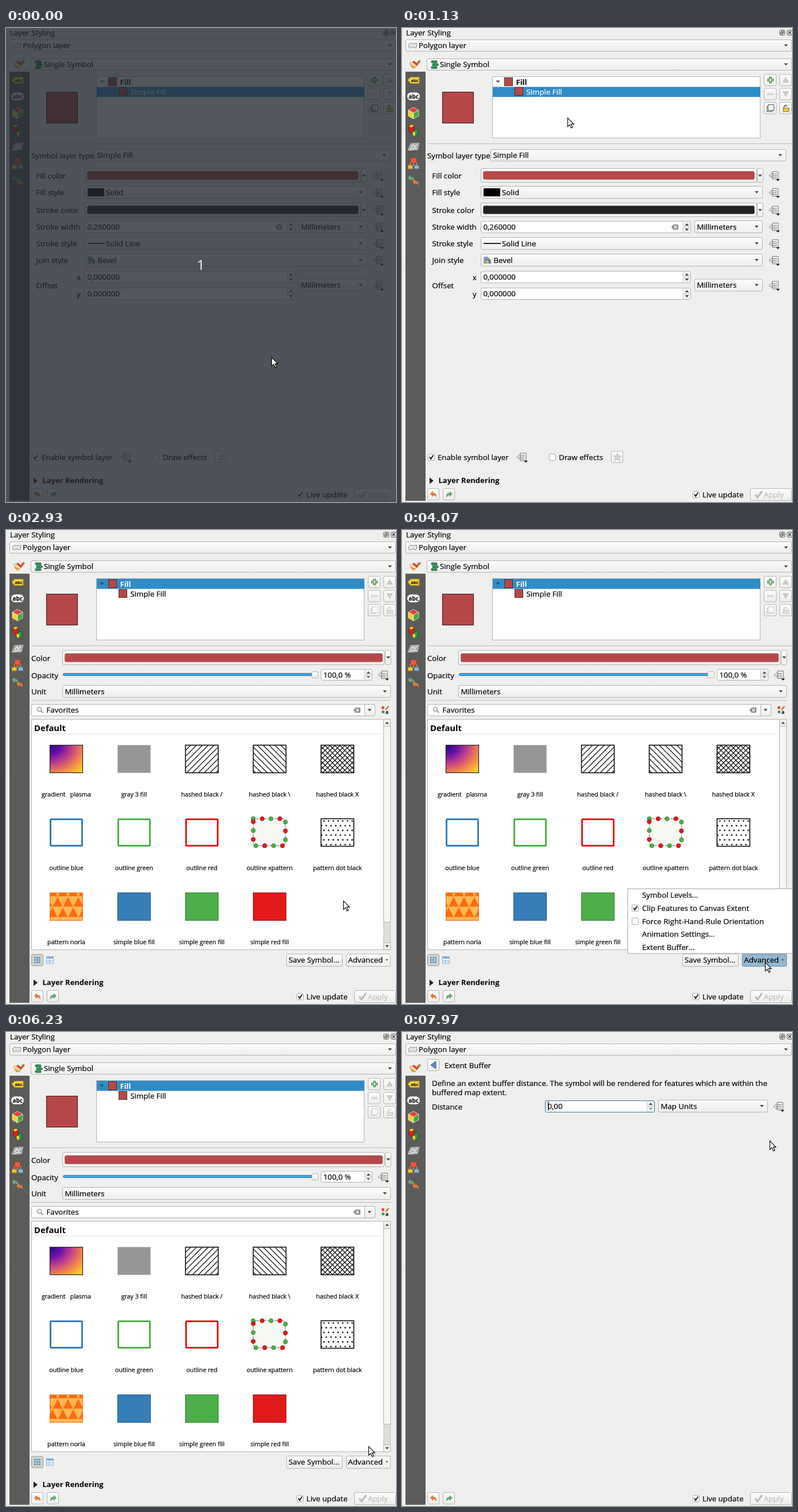
An HTML page that plays this animation: 679x825 px, repeating every 8 s.

```html
<!DOCTYPE html>
<html lang="en">
<head>
<meta charset="utf-8">
<title>Layer styling panel</title>
<style>
html, body { margin: 0; width: 100%; height: 100%; overflow: hidden; background: #efefee; }
svg { display: block; }
text { font: 13.25px "Open Sans", "Noto Sans", sans-serif; white-space: pre; stroke-width: .22; }
text.b { font-weight: 700; font-size: 13px; }
text.s { font-size: 10.7px; text-anchor: middle; }
</style>
</head>
<body>
<svg id="stage" width="679" height="825" viewBox="0 0 679 825" xmlns="http://www.w3.org/2000/svg"></svg>
<script>
const RED = '#b84848', BLUE = '#308cc6', EDGE = '#b3b3b1', BG = '#efefee';

// Drawing helpers, each returns SVG markup
const rect = (x, y, w, h, fill, stroke = 'none', rx = 0, more = '') =>
  `<rect x="${x}" y="${y}" width="${w}" height="${h}" fill="${fill}" stroke="${stroke}" rx="${rx}" ${more}/>`;
const path = (d, fill = 'none', stroke = 'none', sw = 1) =>
  `<path d="${d}" fill="${fill}" stroke="${stroke}" stroke-width="${sw}"/>`;
const text = (x, y, s, fill = '#000', cls = '') =>
  `<text x="${x}" y="${y}" fill="${fill}" stroke="${cls === 'b' ? 'none' : fill}" class="${cls}">${s}</text>`;
const dot = (x, y, r, fill, stroke = 'none') =>
  `<circle cx="${x}" cy="${y}" r="${r}" fill="${fill}" stroke="${stroke}"/>`;
const at = (x, y, body) => `<g transform="translate(${x} ${y})">${body}</g>`;
const group = (id, body) => `<g id="${id}">${body}</g>`;
const range = n => [...Array(n).keys()];

const down = (x, y, c = '#4c4c4c') => path(`M${x - 3.5} ${y - 2}h7l-3.5 4z`, c);
const up = (x, y, c = '#4c4c4c') => path(`M${x - 3.5} ${y + 2}h7l-3.5-4z`, c);
const button = (x, y, w, h, body = '') => rect(x, y, w, h, 'url(#face)', EDGE, 2.5) + body;
const combo = (x, y, w, h, label, lx = x + 4) =>
  button(x, y, w, h, text(lx, y + h / 2 + 4.7, label) + down(x + w - 10, y + h / 2));
const spin = (x, y, w, h, label, edge = EDGE, off = '#4c4c4c') =>
  rect(x, y, w, h, '#fff', edge, 2.5) +
  rect(x + w - 12.5, y + .5, 12, h - 1, '#f3f3f2', 'none', 2) +
  path(`M${x + w - 13} ${y}v${h}M${x + w - 13} ${y + h / 2}h13`, 'none', '#c8c8c6') +
  text(x + 4, y + h / 2 + 4.8, label) +
  up(x + w - 6.5, y + 5.5) + down(x + w - 6.5, y + h - 5.5, off);
const check = (x, y, on) => rect(x + .5, y + .5, 11, 11, '#fff', '#aaa', 1) +
  (on ? path(`M${x + 3} ${y + 5.5}l2.3 3.5 4.2-6.5`, 'none', '#111', 1.8) : '');
const override = (x, y) => at(x, y,
  path('M-9 0l6-5v-2h10v13h-10v-2zM-3-5v9M-3-3h8M-5 0h10M-3 3h8', '#f6f6f6', '#70706e') +
  path('M3 6h7l-3.5 3.5z', '#222'));
const clearMark = (x, y) => at(x, y,
  path('M-6 0l3.5-4.5H6v9H-2.5z', '#8b8b8b') + path('M-1.5-2.5l5 5m0-5l-5 5', 'none', '#fff', 1.2));
const swatch = (x, y) => rect(x + .5, y + .5, 14, 14, RED, '#4a2a2a');
const colorBar = (x, y, w, h, fill) => rect(x, y, w, h, fill, 'rgba(0,0,0,.25)', 2.5);
const triRight = (x, y) => path(`M${x} ${y - 5.5}v11l7-5.5z`, '#222');
const arrow = (x, y, c, flip = 1) => `<g transform="translate(${x} ${y}) scale(${flip} 1)">` +
  path('M-6-1.5l5-4.5v3c5 0 7 3 5.5 8.5-1-3-2.5-4-5.5-4v3z', c) + '</g>';

function sideIcons() {
  const brush = at(22, 63,
    path('M1 1l7-8 2.5 2-7 8z', '#c87a35', '#8f4f1c', .7) +
    path('M-9-3l5-1 8 6-2 3-5 2z', '#f0dfae', '#b59a58', .7) +
    path('M-4-4l3-2 7 6-2 3z', '#d9432f') +
    path('M-8-1q5 5 11 5l-4 3q-6 0-7-8z', '#ef9a3c'));
  const tag = path('M10 90.5l5-5h15v11H15z', '#f5cf3a', '#b8921c') +
    `<text x="15.5" y="93.5" style="font-size:7.5px;font-weight:700">abc</text>`;
  const mask = rect(9.5, 112.5, 21, 13, '#f5f5f5', '#e4e4e4', 6) +
    `<text x="11.5" y="122.5" style="font-size:10px;font-weight:700">abc</text>`;
  const cube = at(20, 148,
    path('M0-10l9 5-9 5-9-5z', '#e04038', '#fff', .7) + path('M-9-5l9 5v10l-9-5z', '#f2cf2c', '#fff', .7) +
    path('M9-5L0 0v10l9-5z', '#42a838', '#fff', .7));
  const bars = at(20, 178,
    path('M-8-7l5-3 4 2v10l-5 2-4-3z', '#d42222', '#6a1010', .7) + path('M-8-7l4 2 5-3-4-2z', '#f1d22f') +
    path('M1 0l3-2 4 2v8l-4 2-4-2z', '#2a9a3a', '#0c4c18', .7) + path('M-2 4l3-2 2 2v5l-3 1z', '#f1d22f'));
  const relief = at(20, 207,
    path('M-10 6l5-12 15-1-3 12z', '#a9a9a7', '#d0d0ce', .7) +
    path('M-5 2l4-6 3 4 4-5M-6 5l8-3 4 1', 'none', '#ececea', 1.4));
  const diagram = at(20, 236,
    path('M-5.5 3V-2H5.500V3M0-2v5', 'none', '#f0a060', 1.4) + rect(-5, -10, 10, 9, '#ee5a46', '#b43422') +
    rect(-9.5, 3, 8, 6, '#f1c13f', '#b88a1a') + rect(1.5, 3, 8, 6, '#8fb9dd', '#527ea5'));
  return brush + rect(6, 76, 35, 747, '#5b5b59') + tag + mask + cube + bars + relief + diagram +
    arrow(16, 262, '#6da879') + arrow(24, 269, '#e07b3c');
}

function frameParts() {
  const blob = path('M12 28q2-3 6-1 5 0 7-1 2 2 0 8-3 2-5-1-4 0-6 2-4-1-2-7z', '#e4e4e4', '#8a8a88');
  return rect(0, 0, 679, 825, BG) + text(7, 12.5, 'Layer Styling') +
    rect(657.5, 3.5, 9, 9, 'none', '#555', 2) + rect(661, 5.5, 3.5, 3.5, 'none', '#444') + rect(659.5, 7.5, 3, 3, BG, '#444') +
    rect(670.5, 3.5, 9, 9, 'none', '#555', 2) + path('M672.5 5.5l5 5m0-5l-5 5', 'none', '#333', 1.3) +
    combo(6.5, 20.5, 672, 20, 'Polygon layer', 29) + blob + sideIcons() +
    range(5).map(i => rect(1 + i % 2 * 2, 406 + i * 3, 1, 1, '#bbb')).join('') +
    button(44.5, 801.5, 20, 20, arrow(55, 812, '#e07b3c')) +
    button(71.5, 801.5, 20, 20, arrow(82, 812, '#6da879', -1)) +
    check(506, 806, true) + text(523, 816.7, 'Live update') +
    button(606.5, 801.5, 72, 21, path('M615 812l4 5 8-11', 'none', '#b9b9b7', 3)) + text(630, 816.7, 'Apply', '#bdbdbb');
}

function header() {
  const bars = [57, 62, 67].map((y, i) => rect(51 + (i === 1 ? 2 : 0), y, 10, 3.5, '#2e9c5c', '#17633a', 1)).join('');
  const plus = path('M641.5 85v11M636 90.5h11', 'none', '#2b7d36', 4.4) + path('M641.5 86v9M637 90.5h9', 'none', '#c4e8c1', 2);
  return combo(43.5, 53.5, 635, 20, 'Single Symbol', 66) + bars +
    rect(70.5, 111.5, 54, 54, RED, '#30181a') + rect(157.5, 84.5, 466, 107, '#fff', EDGE) +
    [80.5, 105, 129.5].map(y => button(630.5, y, 21, 20) + button(657.5, y, 21, 20)).join('') + plus +
    path('M668 85l6 10h-12z', '#c9c9c7') + path('M668 120l6-10h-12z', '#c9c9c7') +
    rect(636.5, 113.5, 10, 3, '#e2e2e0', '#cfcfcd') +
    path('M44 201.5H679', 'none', '#b9b9b7') +
    triRight(48, 788) + text(63.5, 792.3, 'Layer Rendering', '#000', 'b');
}

function tree(fillSelected) {
  const [a, b] = fillSelected ? ['#fff', '#000'] : ['#000', '#fff'];
  const ink = fillSelected ? '#c9c9c7' : '#555';
  return rect(158, fillSelected ? 85 : 102.5, 466, 17.5, BLUE) +
    path('M163.5 91.5h7l-3.5 4z', fillSelected ? '#1c4a68' : '#4c4c4c') +
    swatch(178, 86) + swatch(196, 103) +
    text(198.5, 98.5, 'Fill', a, 'b') + text(216.5, 116, 'Simple Fill', b) +
    rect(635.5, 136.5, 9, 9, '#eee', ink) + rect(637.5, 133.5, 10, 10, '#fafafa', ink) +
    path('M665 139v-2q3-5 5 0', 'none', ink, 1.6) +
    rect(663.5, 139.5, 10, 6, fillSelected ? '#dededc' : '#f0c443', fillSelected ? '#c9c9c7' : '#9a7a1c');
}

function simpleFill() {
  const rows = [['Fill color', 257], ['Fill style', 286.5], ['Stroke color', 317], ['Stroke width', 346.5],
    ['Stroke style', 375.5], ['Join style', 404.5], ['Offset', 448]];
  const colorButton = (y, fill) => button(137.5, y - 12.5, 480, 24) + colorBar(141.5, y - 7.5, 472, 14, fill) +
    button(618.5, y - 12.5, 10, 24, down(623.5, y));
  const bevel = at(142, 398, path('M1 12V1h6l5 5v6', '#a9c3dd', '#2d4f73') + path('M4 12V4h2l4 3v5', 'none', '#3d3d2d', 1.2) +
    path('M1 6l6 6M1 9l3 3', 'none', '#d9b52c', 1.2));
  return text(44, 226.7, 'Symbol layer type') + combo(154.5, 211.5, 514, 20, 'Simple Fill') +
    rows.map(([s, y]) => text(52.5, y + 4.8, s) + override(648, y)).join('') +
    colorButton(257, RED) + combo(137.5, 275.5, 490, 21, 'Solid', 174) + rect(142, 279, 29, 14, '#000') +
    colorButton(317, '#222221') +
    spin(137.5, 336.5, 365, 20, '0,260000') + clearMark(475, 346.5) +
    combo(509.5, 335.5, 118, 21, 'Millimeters') +
    combo(137.5, 364.5, 490, 21, 'Solid Line', 174) + path('M142 375h30', 'none', '#000', 1.7) +
    combo(137.5, 393.5, 490, 21, 'Bevel', 159.5) + bevel +
    text(123, 438.5, 'x') + text(123, 467.5, 'y') +
    spin(137.5, 423.5, 365, 20, '0,000000') + spin(137.5, 452.5, 365, 20, '0,000000') +
    combo(509.5, 437, 118, 21, 'Millimeters') +
    check(45, 741, true) + text(62, 751.7, 'Enable symbol layer') + override(209, 747) +
    check(256, 741, false) + text(273, 751.7, 'Draw effects') +
    button(364.5, 736.5, 20, 20, path('M375 740l2 4.5 5 .5-4 3 1.5 5-4.5-3-4.5 3 1.5-5-4-3 5-.5z', '#d4d4d2', '#bdbdbb'));
}

// Library symbols, drawn in a 57 x 48 box
const W = 57, H = 48;
const clipBox = body => `<svg width="${W}" height="${H}">${body}</svg>`;
const frame = (fill, stroke, sw = 1.2) => rect(0, 0, W, H, fill, stroke, 0, `stroke-width="${sw}"`);
const stripes = (slope, gap) => clipBox(path(range(14).map(i => slope > 0 ?
  `M${i * gap} -1l-60 60` : `M${W - i * gap} -1l60 60`).join(''), 'none', '#111', 1.3));
const hatched = body => frame('#fff', '#111') + body + frame('none', '#111', 1.5);
const outline = c => rect(1, 1, W - 2, H - 2, '#fff', c, 1, 'stroke-width="3"');

function beads() {
  const w = 56, h = 47;
  const point = s => s < w ? [s, 0] : s < w + h ? [w, s - w] : s < 2 * w + h ? [2 * w + h - s, h] : [0, 2 * (w + h) - s];
  return rect(0, 0, w, h, '#f5f8f3', '#777', 5, 'stroke-dasharray="5 1.5"') + range(14).map(i => {
    const [x, y] = point(i * 15.45);
    return dot(x, y, 3.6, i % 2 ? '#e31a1c' : '#4daf4a', i % 2 ? '#a01012' : '#3a8a38');
  }).join('');
}
const dots = () => frame('#fff', '#111') + clipBox(range(6).map(r =>
  range(8).map(c => dot(c * 8.2 + (r % 2 ? 1 : 5), 4 + r * 8.2, 1.35, '#111')).join('')).join('')) + frame('none', '#111', 1.5);
const triangles = () => clipBox(rect(0, 0, W, H, '#feb852') + range(3).map(r =>
  range(5).map(c => path(`M${c * 18 - (r % 2 ? 13 : 4)} ${r * 18 + 6}h17l-8.5-17z`, '#ff6b10')).join('')).join('')) +
  frame('none', '#e07820', 1);

function library() {
  const items = [
    ['gradient   plasma', frame('url(#plasma)', '#222')],
    ['gray 3 fill', frame('#969694', '#bbb', 1)],
    ['hashed black /', hatched(stripes(1, 10.2))],
    ['hashed black \\', hatched(stripes(-1, 10.2))],
    ['hashed black X', hatched(stripes(1, 8.6) + stripes(-1, 8.6))],
    ['outline blue', outline('#377eb8')], ['outline green', outline('#4daf4a')], ['outline red', outline('#e31a1c')],
    ['outline xpattern', beads()], ['pattern dot black', dots()], ['pattern norla', triangles()],
    ['simple blue fill', frame('#377eb8', '#2a5f8c')], ['simple green fill', frame('#4daf4a', '#3a8438')],
    ['simple red fill', frame('#e31a1c', '#a01315')]];
  return items.map(([name, art], i) => {
    const cx = 105 + i % 5 * 118, y = 374.5 + Math.floor(Math.floor(i / 5) * 128.5);
    return at(cx - 28.5, y, art) + text(cx, y + 89.5, name, '#000', 's');
  }).join('');
}

function fillSymbol() {
  const grid = range(9).map(i => rect(49 + i % 3 * 4, 743 + Math.floor(i / 3) * 4, 2.8, 2.8, '#5b94c4')).join('');
  const list = rect(70.5, 742.5, 12, 12, '#fff', '#8fb4d4') + rect(71, 743, 11, 3, '#7fb0dc') +
    path('M70.5 749.5h12M70.5 752h12M75.5 746v8', 'none', '#8fb4d4');
  const styleIcon = rect(654, 307, 4.5, 4.5, '#d8463c') + path('M660 312l5-6 2 1.5-5 6z', '#b5803c') +
    dot(656.5, 316.5, 2.6, '#4a9c4f') + `<text x="660.5" y="320" style="font-size:9px;font-weight:700">a</text>`;
  return text(44, 227.7, 'Color') + button(98.5, 209.5, 560, 25) + colorBar(102.5, 215, 553, 14.5, RED) +
    button(660.5, 209.5, 9.5, 25, down(665.5, 222)) +
    text(44, 257.7, 'Opacity') + rect(99.5, 249.5, 438, 4, '#43a3e0', '#2a78ab', 2) + button(532.5, 246.5, 11, 11) +
    spin(548.5, 242.5, 89, 19, '100,0 %', EDGE, '#777') + override(657, 252.5) +
    text(44, 285.5, 'Unit') + combo(98.5, 270.5, 571, 21, 'Millimeters') +
    path('M44 296.5H670', 'none', '#b9b9b7') +
    rect(44.5, 303.5, 598, 20, '#fff', EDGE, 2.5) + button(624.5, 303.5, 18, 20, down(633, 313.5)) +
    dot(58, 312, 3.7, 'none', '#777') + path('M60.7 314.7l3.5 3.5', 'none', '#777', 1.5) +
    text(70.5, 318.2, 'Favorites') + clearMark(611, 313.5) + styleIcon +
    rect(44.5, 329.5, 625, 401, '#fff', EDGE) +
    `<text x="49" y="350" style="font-weight:700;font-size:14.8px">Default</text>` +
    path('M51 355H650', 'none', '#dcdcda') + library() +
    rect(657.5, 329.5, 12, 401, '#dddddb', '#c3c3c1') + rect(657.5, 341.5, 12, 341, '#f6f6f5', EDGE) +
    rect(657.5, 329.5, 12, 12, '#f3f3f2', EDGE) + rect(657.5, 718.5, 12, 12, '#f3f3f2', EDGE) +
    up(663.5, 335.5) + down(663.5, 724.5) +
    rect(44.5, 738.5, 20, 20, '#d3d3d1', '#9c9c9a', 2.5) + grid + list +
    button(488.5, 738, 97, 21.5, text(492, 753.2, 'Save Symbol…')) + button(592.5, 738, 77, 21.5) +
    group('pressed', rect(592.5, 738, 77, 21.5, '#93b7d0', '#5f90b2', 2.5)) +
    text(595.5, 753.2, 'Advanced') + path('M660.5 747h5l-2.5 3z', '#666');
}

function menu() {
  const items = ['Symbol Levels…', 'Clip Features to Canvas Extent', 'Force Right-Hand-Rule Orientation', 'Animation Settings…'];
  const last = fill => text(418, 731, 'Extent Buffer…', fill);
  return rect(393, 624.5, 290, 112.5, '#fff', '#a3a3a1') +
    items.map((s, i) => text(418, 640.2 + i * 22.7, s)).join('') +
    check(400, 652, true) + check(400, 675, false) + last('#000') +
    group('hot', rect(393, 714.5, 286, 22.5, BLUE) + last('#fff'));
}

const extentBuffer = () =>
  button(44.5, 47.5, 20, 20, path('M59 51v13l-9-6.5z', '#5c8fbe', '#2d5578')) + text(74, 62.7, 'Extent Buffer') +
  text(52, 94.3, 'Define an extent buffer distance. The symbol will be rendered for features which are within the') +
  text(52, 109.5, 'buffered map extent.') + text(52, 134.8, 'Distance') +
  spin(249.5, 119.5, 190, 20, '0,00', '#2f73a0', '#999') + combo(446.5, 118.5, 190, 21, 'Map Units') +
  override(656, 129.5) + group('caret', rect(254, 121, 1.2, 16, '#000'));

const defs = `<defs>
  <linearGradient id="face" x2="0" y2="1"><stop stop-color="#fcfcfc"/><stop offset="1" stop-color="#eeeeed"/></linearGradient>
  <radialGradient id="plasma" cx="0" cy="0" r="1.4">
    <stop stop-color="#1c0a90"/><stop offset=".25" stop-color="#6a10a8"/><stop offset=".48" stop-color="#c0408a"/>
    <stop offset=".7" stop-color="#f0804e"/><stop offset=".9" stop-color="#fdc030"/><stop offset="1" stop-color="#f8dd25"/>
  </radialGradient></defs>`;

document.getElementById('stage').innerHTML = defs + frameParts() +
  group('symbol', header() + group('treeA', tree(false)) + group('treeB', tree(true))) +
  group('simple', simpleFill()) + group('fill', fillSymbol()) + group('menu', menu()) + group('buffer', extentBuffer()) +
  group('dim', rect(0, 0, 679, 825, '#232a31', 'none', 0, 'opacity=".79"') +
    '<text x="339" y="421" fill="#fff" text-anchor="middle" style="font-size:24px">1</text>') +
  group('cursor', path('M.5.5v15l3.5-3.2 2.6 5.7 2.4-1.1-2.6-5.5h4.7z', '#fff', '#000', 1.1));

// Pointer stops: time, x, y
const stops = [[0, 462, 573], [30, 463, 571], [250, 463, 571], [450, 452, 629], [1080, 288, 157], [1630, 281, 97],
  [2270, 281, 97], [3110, 628, 717], [3270, 632, 752], [4470, 632, 752], [5000, 631, 721],
  [7380, 631, 721], [7970, 640, 189]];

function pointer(t) {
  const i = stops.findIndex(s => s[0] > t);
  if (i < 0) return stops[stops.length - 1].slice(1);
  const [t0, x0, y0] = stops[i - 1], [t1, x1, y1] = stops[i];
  const u = (t - t0) / (t1 - t0), k = t < 30 ? 0 : u * u * (3 - 2 * u);
  return [x0 + (x1 - x0) * k, y0 + (y1 - y0) * k];
}

const part = id => document.getElementById(id);
const show = (id, on) => { part(id).style.display = on ? '' : 'none'; };

function draw(t) {
  const [x, y] = pointer(t).map(Math.round);
  const open = t >= 4070 && t < 6230, form = t >= 6270;
  show('symbol', !form);
  show('treeA', t < 1930);
  show('treeB', t >= 1930);
  show('simple', t < 1930);
  show('fill', t >= 1930 && !form);
  show('pressed', open);
  show('menu', open);
  show('hot', y < 737);
  show('buffer', form);
  show('caret', t < 6800 || t >= 7400);
  show('dim', t < 30);
  part('cursor').setAttribute('transform', `translate(${x} ${y})`);
}

const start = performance.now();
function tick() {
  draw((performance.now() - start) % 8000);
  requestAnimationFrame(tick);
}
tick();
</script>
</body>
</html>
```
